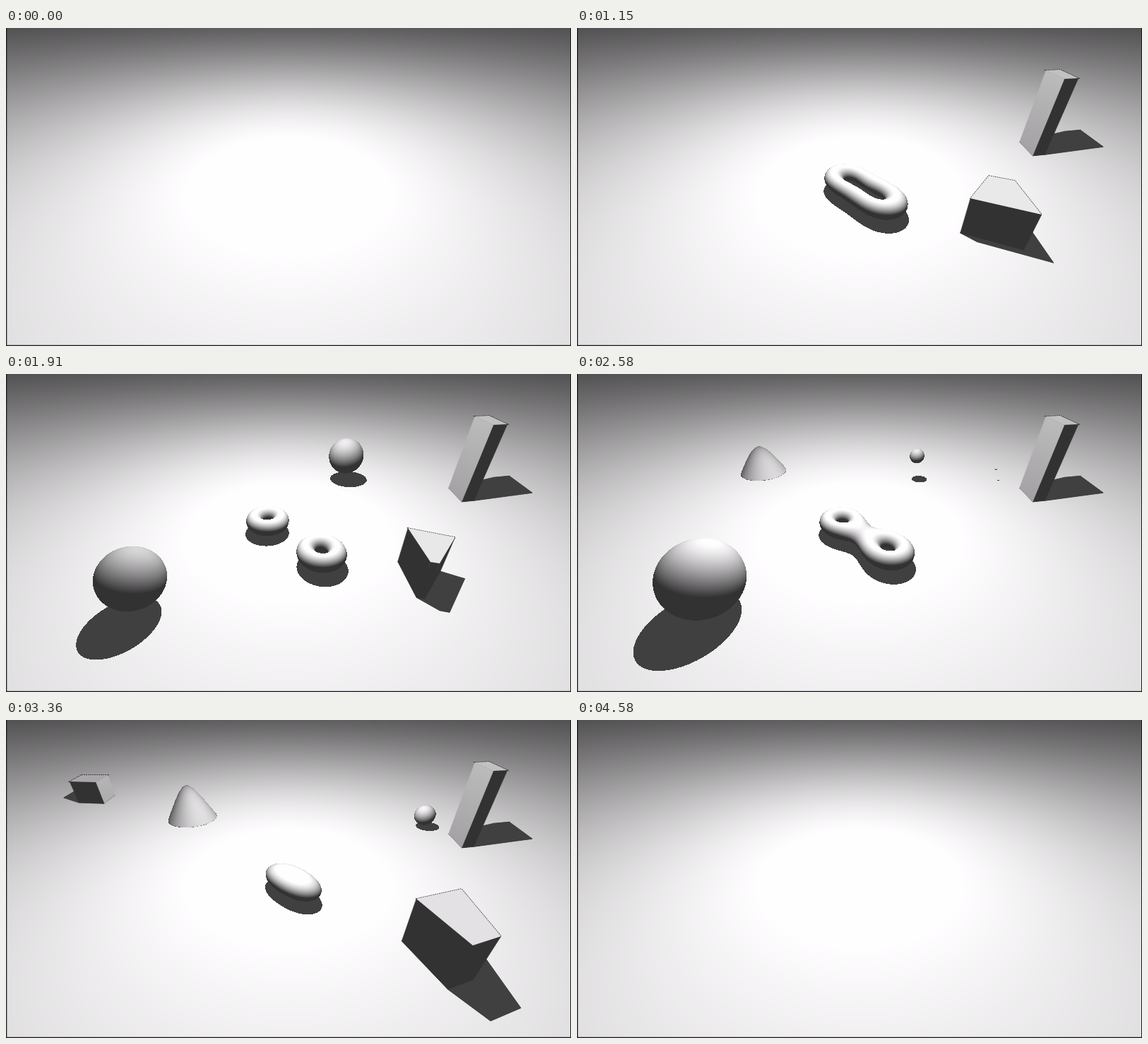
These frames come from a looping animation (800 px wide and 450 px high, 5 s). An HTML page with a canvas:

```html
<!DOCTYPE html>
<html lang="en">
<head>
<meta charset="utf-8">
<title>Slices of four-dimensional solids</title>
<style>
html, body { margin: 0; height: 100%; overflow: hidden; background: #fff; }
canvas { display: block; width: 100vw; height: 100vh; }
</style>
</head>
<body>
<canvas width="800" height="450"></canvas>
<script>
const W = 800, H = 450, LOOP = 5000;
const FOCAL = 389.7, SIN = Math.sqrt(1 / 3), COS = Math.sqrt(2 / 3);
const LIGHT = [0, 2, 1.5], SHADOW = 0.255, AMBIENT = 0.2;
const SPEED = 0.00022; // how fast the slice moves along the fourth axis, per ms
const ctx = document.querySelector('canvas').getContext('2d');
const { hypot, max, min, floor, ceil } = Math;

// The camera sits one unit above the floor and looks down.
function ray(x, y) {
  const u = (x - W / 2) / FOCAL, v = (H / 2 - y) / FOCAL;
  return [u, v * COS - SIN, COS + v * SIN];
}
function unproject(x, y, height) {
  const d = ray(x, y), t = (height - 1) / d[1];
  return [d[0] * t, height, d[2] * t];
}
function project([x, y, z]) {
  const depth = (1 - y) * SIN + z * COS;
  return [W / 2 + FOCAL * x / depth, H / 2 - FOCAL * ((y - 1) * COS + z * SIN) / depth];
}
function castShadow([x, y, z]) {
  const s = LIGHT[1] / (LIGHT[1] - y);
  return [x * s, 0, LIGHT[2] + (z - LIGHT[2]) * s];
}
function facing(x, y, z, nx, ny, nz) {
  const lx = LIGHT[0] - x, ly = LIGHT[1] - y, lz = LIGHT[2] - z;
  return max(0, (lx * nx + ly * ny + lz * nz) / hypot(lx, ly, lz));
}
const lit = cos => min(1, AMBIENT + 0.84 * cos);
function gray(v) {
  const g = v * 255;
  return `rgb(${g},${g - 1.5},${g})`;
}

const image = ctx.createImageData(W, H);
function setPixel(x, y, v) {
  const i = (y * W + x) * 4, g = v * 255;
  image.data[i] = g;
  image.data[i + 1] = g - 1.5;
  image.data[i + 2] = g;
  image.data[i + 3] = 255;
}
for (let y = 0; y < H; y++)
  for (let x = 0; x < W; x++)
    setPixel(x, y, lit(facing(...unproject(x + 0.5, y + 0.5, 0), 0, 1, 0)));
const floorPixels = image.data.slice();

// Round solids: 4D distance functions, sliced at offset w.
const glome = r => ({
  half: [r, r, r],
  sdf: w => (x, y, z) => hypot(x, y, z, w) - r,
});
// A ball whose radius is proportional to w.
const ballCone = slope => ({
  half: [0.24, 0.24, 0.24],
  sdf: w => (x, y, z) => (hypot(x, y, z) - max(0, slope * w)) / hypot(1, slope),
});
const cone = (radius, height) => ({
  half: [radius, height, radius],
  sdf: w => (x, y, z) =>
    max((y - height + hypot(x, z, w) * height / radius) / hypot(1, height / radius), -y),
});
const ditorus = (spread, ring, tube) => ({
  half: [0.28, tube, 0.28],
  sdf: w => (x, y, z) => {
    const along = 0.695 * x - 0.72 * z, across = 0.72 * x + 0.695 * z;
    return hypot(hypot(hypot(along, w) - spread, across) - ring, y) - tube;
  },
});
const roundSolids = [
  { from: 640, to: 3630, mid: 2044, center: unproject(405.5, 228, 0.09), ...ditorus(0.218, 0.082, 0.047) },
  { from: 2011, to: 3900, mid: 3047, center: [-0.878, 0, 2.39], ...cone(0.225, 0.42) },
  { from: 1730, to: 3173, mid: 2400, center: unproject(178.5, 289, 0.198), ...glome(0.169) },
  { from: 1190, to: 3060, mid: 3060, center: unproject(481.5, 116, 0.236), ...ballCone(-0.53) },
  { from: 2500, to: 3700, mid: 2500, center: unproject(593, 134.5, 0.12), ...ballCone(0.42) },
  { from: 3400, to: 4580, mid: 3899, center: unproject(456, 177, 0.228), ...glome(0.174) },
];

function march(sdf, x, y, z, dx, dy, dz, from, to) {
  for (let i = 0, t = from; i < 60 && t < to; i++) {
    const d = sdf(x + dx * t, y + dy * t, z + dz * t);
    if (d < 0.0007) return t;
    t += d;
  }
  return -1;
}
function screenBox(center, half) {
  const xs = [], ys = [];
  for (let i = 0; i < 8; i++) {
    const corner = center.map((c, k) => c + (i >> k & 1 ? half[k] : -half[k]));
    for (const [x, y] of [project(corner), project(castShadow(corner))]) {
      xs.push(x);
      ys.push(y);
    }
  }
  return [max(0, floor(min(...xs))), max(0, floor(min(...ys))),
    min(W, ceil(max(...xs))), min(H, ceil(max(...ys)))];
}
function drawRound({ center, half }, sdf) {
  const [cx, cy, cz] = center, [x0, y0, x1, y1] = screenBox(center, half);
  const reach = hypot(...half), away = hypot(cx, cy - 1, cz), e = 0.002;
  for (let py = y0; py < y1; py++)
    for (let px = x0; px < x1; px++) {
      let [dx, dy, dz] = ray(px + 0.5, py + 0.5);
      const ground = -1 / dy, len = hypot(dx, dy, dz);
      const fx = dx * ground, fz = dz * ground;
      dx /= len; dy /= len; dz /= len;
      const t = march(sdf, -cx, 1 - cy, -cz, dx, dy, dz, away - reach, min(away + reach, ground * len));
      if (t > 0) {
        const x = dx * t - cx, y = 1 + dy * t - cy, z = dz * t - cz;
        // Not normalized: the part of the normal along w takes its share of the light.
        const nx = (sdf(x + e, y, z) - sdf(x - e, y, z)) / (2 * e);
        const ny = (sdf(x, y + e, z) - sdf(x, y - e, z)) / (2 * e);
        const nz = (sdf(x, y, z + e) - sdf(x, y, z - e)) / (2 * e);
        setPixel(px, py, lit(facing(x + cx, y + cy, z + cz, nx, ny, nz)));
        continue;
      }
      const lx = LIGHT[0] - fx, ly = LIGHT[1], lz = LIGHT[2] - fz, l = hypot(lx, ly, lz);
      const far = hypot(fx - cx, cy, fz - cz) + reach;
      if (march(sdf, fx - cx, -cy, fz - cz, lx / l, ly / l, lz / l, 0, far) >= 0)
        setPixel(px, py, SHADOW);
    }
}

// Upright prisms: the top face in two poses on screen. They grow out of the
// first pose's middle and shrink into the last one's, unless they pop.
const prisms = [
  { height: 0.552, from: 870, to: 4300, pop: true, times: [870, 4300],
    poses: [[664, 60, 684, 59, 710, 71, 690, 72]] },
  { height: 0.222, from: 700, to: 2340, times: [1150, 1910],
    poses: [[583, 209, 620, 216, 658, 264, 557, 241], [569, 218, 636, 231, 614, 268, 601, 266]] },
  { height: 0.26, from: 2880, to: 4400, times: [3360, 3970],
    poses: [[581, 253, 645, 239, 701, 306, 661, 319], [579, 247, 629, 236, 712, 292, 621, 318]] },
  { height: 0.215, from: 2870, to: 4060, times: [3360, 3970],
    poses: [[107, 78, 144, 78, 127, 88, 90, 87], [124, 78, 126, 78, 107, 87, 104, 86]] },
];
function topCorners({ from, to, pop, times: [t0, t1], poses }, t) {
  const [a, b = a] = poses;
  const k = min(1, max(0, (t - t0) / (t1 - t0)));
  const size = pop ? 1 : min(1, (t - from) / (t0 - from), (to - t) / (to - t1));
  const pose = a.map((v, i) => v + (b[i] - v) * k);
  return pose.map((v, i) => {
    const mid = (pose[i % 2] + pose[i % 2 + 2] + pose[i % 2 + 4] + pose[i % 2 + 6]) / 4;
    return mid + (v - mid) * size;
  });
}

function trace(points) {
  ctx.beginPath();
  for (const p of points) ctx.lineTo(...project(p));
  ctx.closePath();
}
function fillFace(points, fill, seam = 0) {
  trace(points);
  ctx.fillStyle = ctx.strokeStyle = fill;
  ctx.fill();
  ctx.lineWidth = seam;
  if (seam) ctx.stroke();
}
const middle = points => [0, 1, 2].map(k => points.reduce((s, p) => s + p[k], 0) / points.length);

function sideFill(high, low, nx, nz) {
  // Sides lean along w, so grazing light does not reach them.
  if (facing(...high, nx, 0, nz) < 0.5) return gray(AMBIENT);
  const fill = ctx.createLinearGradient(...project(high), ...project(low));
  [high, low].forEach((p, i) => fill.addColorStop(i, gray(lit(facing(...p, nx, 0, nz)))));
  return fill;
}
function drawPrism(height, corners) {
  const top = [0, 2, 4, 6].map(i => unproject(corners[i], corners[i + 1], height));
  const base = top.map(([x, , z]) => [x, 0, z]);
  const cast = top.map(castShadow), core = middle(top);
  const edges = top.map((_, i) => [i, (i + 1) % 4]);

  fillFace(cast, gray(SHADOW), 0.7);
  for (const [i, j] of edges) fillFace([base[i], base[j], cast[j], cast[i]], gray(SHADOW), 0.7);

  trace(top);
  ctx.setLineDash([2, 1]);
  ctx.lineWidth = 1.4;
  ctx.strokeStyle = '#222';
  ctx.stroke();
  ctx.setLineDash([]);

  for (const [i, j] of edges) {
    const a = top[i], b = top[j], len = hypot(b[0] - a[0], b[2] - a[2]);
    if (len < 1e-4) continue;
    let nx = (b[2] - a[2]) / len, nz = (a[0] - b[0]) / len;
    if (nx * (a[0] - core[0]) + nz * (a[2] - core[2]) < 0) { nx = -nx; nz = -nz; }
    if (nx * a[0] + nz * a[2] >= 0) continue;
    const fill = sideFill(middle([a, b]), middle([base[i], base[j]]), nx, nz);
    fillFace([a, b, base[j], base[i]], fill, 0.5);
  }
  fillFace(top, gray(lit(0.94 * facing(...core, 0, 1, 0))));
}

function draw() {
  const t = performance.now() % LOOP;
  const alive = ({ from, to }) => t >= from && t < to;
  image.data.set(floorPixels);
  for (const solid of roundSolids.filter(alive)) drawRound(solid, solid.sdf((t - solid.mid) * SPEED));
  ctx.putImageData(image, 0, 0);
  for (const prism of prisms.filter(alive)) drawPrism(prism.height, topCorners(prism, t));
  ctx.fillStyle = '#1c1a1c';
  ctx.fillRect(0, 0, 1.3, H);
  ctx.fillRect(W - 1, 0, 1, H);
  ctx.fillRect(0, H - 1.3, W, 1.3);
  requestAnimationFrame(draw);
}
draw();
</script>
</body>
</html>
```
